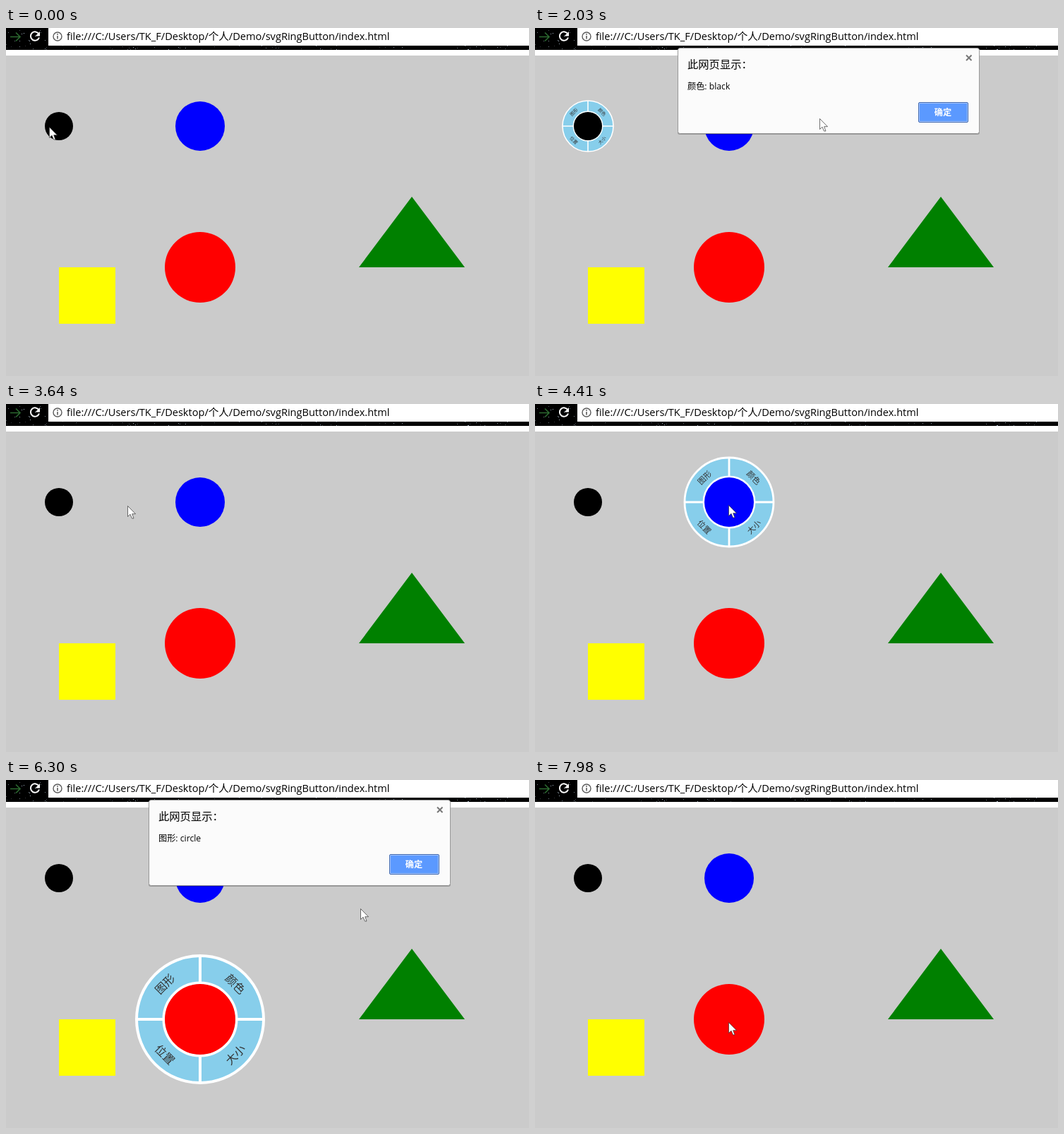
Recreate the animation shown at these times as an HTML page. Size 741 by 493 pixels, loop 8000 ms.

```html
<!DOCTYPE html>
<html lang="zh-CN">
<head>
<meta charset="utf-8">
<style>
  html, body { margin: 0; width: 100%; height: 100%; overflow: hidden; background: #cbcbcb; }
  svg { display: block; font-family: "Open Sans", "Noto Sans CJK SC", "Noto Sans CJK", sans-serif; }
  .ring text { text-anchor: middle; dominant-baseline: central; fill: #333; }
</style>
</head>
<body>
<svg width="741" height="493" viewBox="0 0 741 493">
  <rect width="741" height="493" fill="#cbcbcb"/>
  <rect width="741" height="31"/>
  <g id="stars"></g>
  <rect x="60" width="681" height="25" fill="#fff"/>
  <rect y="31" width="741" height="8" fill="#fff"/>
  <path d="M6 12.5H20M14 6.5L20 12.5L14 18.5" fill="none" stroke="#2c6a30" stroke-width="1.6"/>
  <path d="M46.5 8.5A6.2 6.2 0 1 0 47 13.5" fill="none" stroke="#fff" stroke-width="2"/>
  <path d="M48 5V11.5H41.5Z" fill="#fff"/>
  <circle cx="73" cy="12" r="6" fill="none" stroke="#5a5a5a" stroke-width="1.4"/>
  <path d="M73 11V15.5M73 8V9.7" stroke="#5a5a5a" stroke-width="1.6"/>
  <text x="86" y="17" font-size="14.57">file:///C:/Users/TK_F/Desktop/个人/Demo/svgRingButton/index.html</text>

  <g id="discs"></g>
  <rect x="75" y="339" width="80" height="80" fill="yellow"/>
  <path d="M575 239L650 339H500Z" fill="green"/>

  <g id="dialog">
    <rect x="202" y="29" width="428" height="122" rx="3" fill="#000" opacity=".25"/>
    <rect x="202.500" y="28.500" width="427" height="121" rx="3" fill="#fbfbfb" stroke="#999"/>
    <text x="216" y="57" font-size="15.300">此网页显示：</text>
    <text id="message" x="216" y="87" font-size="12.200"></text>
    <path d="M611 38.500L618.500 46M618.500 38.500L611 46" stroke="#777" stroke-width="2"/>
    <rect x="543.500" y="105.500" width="70" height="28" rx="1.500" fill="#a9c8ff" stroke="#3f68ae"/>
    <rect id="button" x="545" y="107" width="67" height="25"/>
    <text x="578" y="124" font-size="12.200" font-weight="700" fill="#fff" text-anchor="middle">确定</text>
  </g>

  <path id="cursor" d="M.5 .5V15.500L4 12.200L6.500 18H9L6.700 11.700H11.500Z" fill="#fff" stroke="#333" stroke-width=".7"/>
</svg>
<script>
const $ = id => document.getElementById(id);
const LOOP = 8000, STEP = 70, FADE = 210;

const discs = [
  { x: 75, y: 139, r: 20, fill: 'black', open: 210, close: 3430 },
  { x: 275, y: 139, r: 35, fill: 'blue', open: 3990, close: 4550 },
  { x: 275, y: 339, r: 50, fill: 'red', open: 5040, close: 7980 },
];

const dialogs = [
  { from: 1400, to: 2800, message: '颜色: black' },
  { from: 5810, to: 7280, message: '图形: circle' },
];

// Pointer moves: start, end, target x and y, downward sag of the arc
const home = [61, 140];
const moves = [
  [350, 490, 68, 141, 0],
  [560, 980, 92, 122, 0],
  [1750, 2200, 550, 124, 5],
  [2200, 2590, 567, 118, 0],
  [2590, 3220, 69, 144, 38],
  [3430, 3850, 274, 143, 0],
  [4550, 5180, 260, 335, 0],
  [5390, 5740, 235, 291, 0],
  [6000, 6400, 552, 128, 60],
  [6400, 6860, 567, 118, 0],
  [7140, 7910, 274, 343, 0],
];

const clamp = k => Math.max(0, Math.min(1, k));
const smooth = k => k * k * (3 - 2 * k);
const show = (el, on) => el.setAttribute('visibility', on ? 'visible' : 'hidden');

function discMarkup({ x, y, r, fill }) {
  const outer = 1.8 * r;
  const words = ['颜色', '大小', '位置', '图形'].map((word, i) => {
    const sx = i < 2 ? 1 : -1, sy = i % 3 ? 1 : -1;
    return `<text transform="translate(${sx * r} ${sy * r}) rotate(${-45 * sx * sy})" font-size="${.32 * r}">${word}</text>`;
  });
  return `<g transform="translate(${x} ${y})">
    <g class="ring"><g fill="skyblue" stroke="#fff" stroke-width="${.08 * r}">
      <circle r="${outer}"/><path d="M0 ${-outer}V${outer}M${-outer} 0H${outer}"/>
      <circle r="${1.03 * r}"/></g>${words.join('')}</g>
    <circle r="${r}" fill="${fill}"/></g>`;
}

function starMarkup() {
  let seed = 7, out = '';
  const random = () => (seed = seed * 16807 % 2147483647) / 2147483647;
  for (let i = 0; i < 75; i++) {
    const corner = i < 15;
    const x = Math.floor(random() * (corner ? 60 : 741));
    const y = Math.floor(corner ? random() * 25 : 25 + random() * 6);
    out += `<rect x="${x}" y="${y}" width="1" height="1" fill="#bcd" opacity="${.2 + .7 * random()}"/>`;
  }
  return out;
}

function pointerAt(t) {
  return moves.reduce(([x, y], [from, to, tx, ty, sag]) => {
    const k = smooth(clamp((t - from) / (to - from)));
    return [x + (tx - x) * k, y + (ty - y) * k + sag * Math.sin(Math.PI * k)];
  }, home).map(Math.round);
}

$('stars').innerHTML = starMarkup();
$('discs').innerHTML = discs.map(discMarkup).join('');
const rings = document.querySelectorAll('.ring');

function draw() {
  const t = Math.floor(performance.now() % LOOP / STEP) * STEP;
  discs.forEach(({ open, close }, i) => show(rings[i], t >= open && t < close));

  const [x, y] = pointerAt(t);
  $('cursor').setAttribute('transform', `translate(${x} ${y})`);
  const hover = x > 543 && x < 614 && y > 105 && y < 134;
  $('button').setAttribute('fill', hover ? '#69a3ff' : '#5b99ff');

  const dialog = dialogs.find(({ from, to }) => t > from && t < to);
  show($('dialog'), dialog);
  if (dialog) {
    const shown = clamp(Math.min(t - dialog.from, dialog.to - t) / FADE);
    $('message').textContent = dialog.message;
    $('dialog').setAttribute('opacity', shown);
    $('dialog').setAttribute('transform', `translate(0 ${-16 * (1 - shown)})`);
  }
  requestAnimationFrame(draw);
}
requestAnimationFrame(draw);
</script>
</body>
</html>
```
